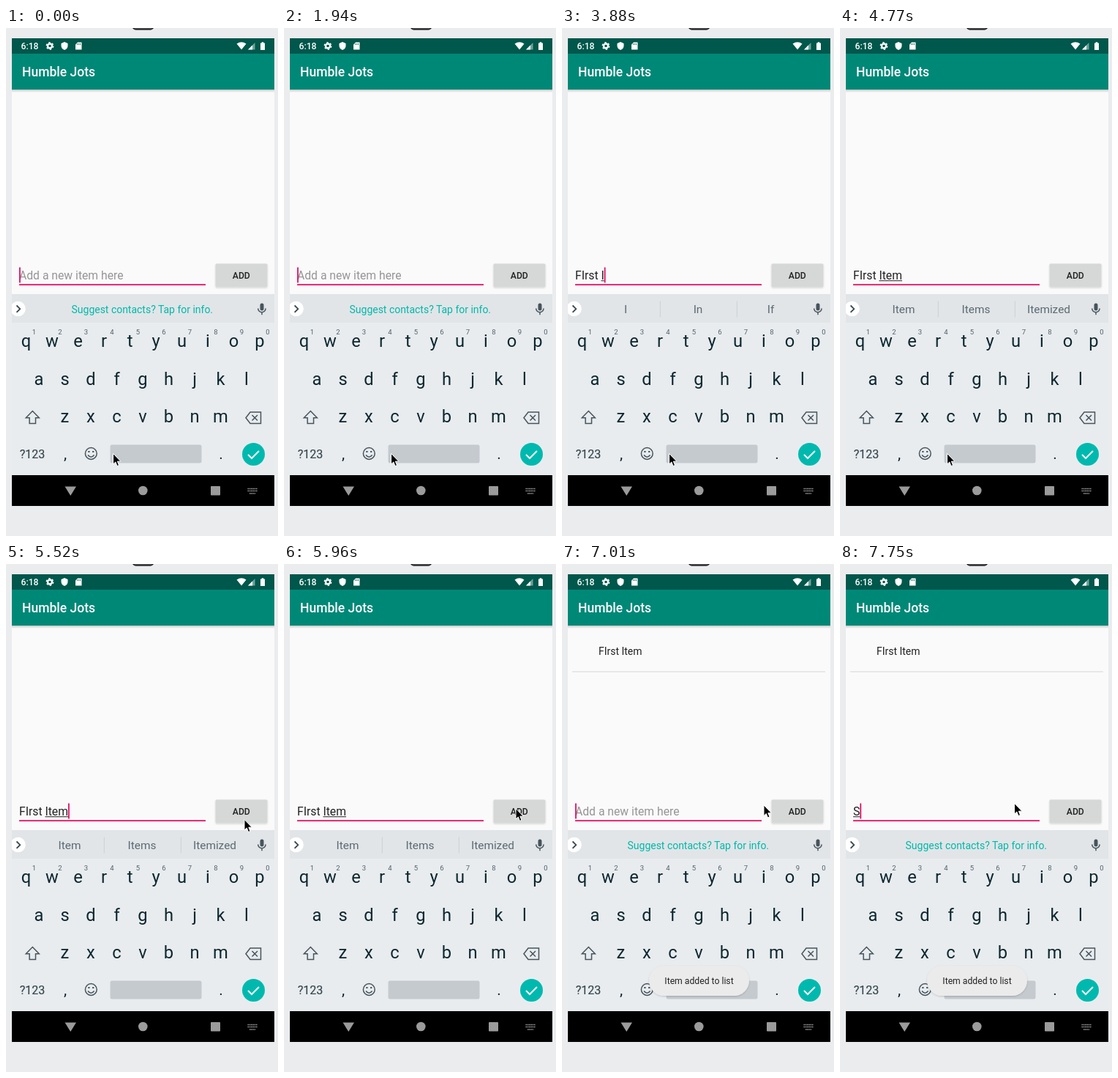
Write an HTML page that moves like this. It is 372 px wide and 693 px high and loops after 8 s.

```html
<!DOCTYPE html>
<html lang="en">
<head>
<meta charset="utf-8">
<title>Todo app</title>
<style>
  html, body { margin: 0; height: 100%; overflow: hidden; background: #ebecee; }
  svg { display: block; width: 100vw; height: 100vh; font-family: Roboto, sans-serif; }
  text { white-space: pre; }
  .mid { text-anchor: middle; }
  .bold { font-weight: 500; }
  .line { fill: none; stroke: #46545c; stroke-width: 1.5; }
</style>
</head>
<body>
<svg viewBox="0 0 372 693">
  <defs>
    <linearGradient id="fade" x2="0" y2="1">
      <stop stop-color="#000" stop-opacity=".2"/><stop offset="1" stop-color="#000" stop-opacity="0"/>
    </linearGradient>
    <filter id="soft" x="-10%" y="-20%" width="120%" height="150%">
      <feDropShadow dx="0" dy="1" stdDeviation="1.2" flood-opacity=".18"/>
    </filter>
    <clipPath id="screen"><path d="M8 14H367V652H8Z"/></clipPath>
  </defs>
  <rect width="372" height="693" fill="#ebecee"/>
  <rect x="173.5" y="-10" width="28" height="12" rx="4" fill="#55585c" stroke="#222" stroke-width="1.5"/>

  <g clip-path="url(#screen)">
    <rect x="8" y="84" width="359" height="280" fill="#fafafa"/>
    <rect x="8" y="84" width="359" height="4" fill="url(#fade)"/>
    <rect x="8" y="35" width="359" height="49" fill="#008877"/>
    <rect x="8" y="14" width="359" height="21" fill="#00574b"/>
    <rect x="8" y="363" width="359" height="39" fill="#e1e5e8"/>
    <rect x="8" y="402" width="359" height="208" fill="#e8ecef"/>
    <rect x="8" y="610" width="359" height="42"/>

    <!-- status bar -->
    <g fill="#fff">
      <text class="bold" x="20.5" y="29" font-size="12.2">6:18</text>
      <circle cx="60" cy="24.5" r="3" fill="none" stroke="#fff" stroke-width="2.4"/>
      <circle cx="60" cy="24.5" r="4.7" fill="none" stroke="#fff" stroke-width="1.4" stroke-dasharray="2.5 2.42"/>
      <path d="M80 19l4.5 2v3.2q0 4-4.5 5.8q-4.5-1.800-4.500-5.800V21z"/>
      <path d="M98 19.500h5.500v10h-8.500v-7z"/>
      <path d="M315.500 21.500q6.500-4.500 13 0l-6.500 8z"/>
      <path d="M331 29.500l9.500-9.500v9.500z" opacity=".45"/>
      <path d="M331 29.500l6-6v6z"/>
      <path d="M348 20.500h1.700v-1.200h2.600v1.200h1.700v9.500h-6z"/>
    </g>
    <path d="M97.500 21v2m2-2v2m2-2v2" stroke="#00574b" stroke-width=".8"/>
    <text class="bold" x="22" y="66" font-size="17.5" fill="#fff">Humble Jots</text>

    <!-- list and input -->
    <g id="item">
      <text x="50" y="124" font-size="13.97" fill="#212121">FIrst Item</text>
      <rect x="14" y="146.300" width="346" height="1.300" fill="#dedede"/>
    </g>
    <text id="hint" x="18" y="343" font-size="15.72" fill="#959595">Add a new item here</text>
    <text id="field" x="18" y="343" font-size="15.72" fill="#212121"></text>
    <rect id="under" y="344.200" height="1.100" fill="#333"/>
    <rect x="18" y="349.300" width="255" height="1.800" fill="#e01065"/>
    <rect id="caret" y="326.500" width="1.800" height="21" fill="#e01065"/>
    <rect x="286.500" y="321.500" width="71" height="32" rx="1.500" fill="#d6d7d7" filter="url(#soft)"/>
    <text class="mid bold" x="321.800" y="342" font-size="12.2" fill="#212121">ADD</text>

    <!-- suggestion strip -->
    <circle cx="16.500" cy="383" r="10.300" fill="#fff"/>
    <path class="line" d="M14.500 378.500l4.700 4.700-4.700 4.700" style="stroke:#37474f;stroke-width:1.800"/>
    <text id="tip" class="mid" x="186.300" y="388.500" font-size="13.97" fill="#00b8a9">Suggest contacts? Tap for info.</text>
    <g id="words" class="mid" font-size="15.4" fill="#5c6a72">
      <path d="M134.300 372.500v22m105-22v22" stroke="#cbd1d5"/>
      <text x="87" y="389"></text><text x="186" y="389"></text><text x="285.500" y="389"></text>
    </g>
    <rect x="347.500" y="375.500" width="5" height="10" rx="2.500" fill="#46545c"/>
    <path class="line" d="M344.700 382.500a5.200 5.200 0 0 0 10.400 0M350 387.700v3.600"/>

    <!-- keyboard -->
    <g id="keys" class="mid" fill="#0d2730" font-size="23.7"></g>
    <path class="line" d="M36.300 522.500l9 9.300h-4.800v7.700h-8.400v-7.700h-4.800z"/>
    <path class="line" d="M334 524h14.500v15.500H334l-6-7.700zM336.500 528l7.500 7.500m0-7.500l-7.500 7.500"/>
    <text class="mid" x="36" y="586.500" font-size="16" fill="#37474f" stroke="#37474f" stroke-width=".2">?123</text>
    <g class="mid" font-size="21" fill="#0d2730"><text x="81" y="588">,</text><text x="294" y="588">.</text></g>
    <circle class="line" cx="116.300" cy="580.500" r="7.900"/>
    <path class="line" d="M112 582.500q4.300 5.500 8.600 0"/>
    <path d="M112.300 578h2.200m3.600 0h2.200" stroke="#46545c" stroke-width="2.200"/>
    <rect x="142.500" y="568.500" width="125" height="25" rx="2.500" fill="#c5cacf"/>
    <circle cx="338.500" cy="581.500" r="15.500" fill="#00b9ae"/>
    <path class="line" d="M331 582l5 5 10-10" style="stroke:#fff;stroke-width:2"/>

    <!-- navigation -->
    <g fill="#9b9b9b">
      <path d="M80.500 625.500h15.500l-7.750 12.500z"/>
      <circle cx="187.300" cy="631" r="6.300"/>
      <rect x="280" y="625" width="13" height="12.500" rx=".8"/>
    </g>
    <path d="M330.500 628.500h13M330.500 631.500h13M333 635h8" stroke="#9b9b9b" stroke-width="1.500" stroke-dasharray="1.600 .68"/>

    <g id="toast">
      <rect x="119" y="548" width="137" height="41" rx="20.500" fill="#ebebeb" filter="url(#soft)"/>
      <text class="mid" x="187.500" y="572.500" font-size="12.2" fill="#222">Item added to list</text>
    </g>
  </g>
  <path id="mouse" d="M0 0V14.500L3.300 11.500 5.500 17 8 16 5.800 10.700H10.400Z" stroke="#fff" stroke-width="1"/>
</svg>
<script>
const $ = id => document.getElementById(id);
const show = (id, on) => $(id).setAttribute('opacity', +on);

// Each track holds [time, value] pairs; a value stays until the next one.
const typed = [[0, ''], [2240, 'F'], [2390, 'FI'], [2690, 'FIrs'], [2980, 'FIrst'], [3130, 'FIrst '],
  [3880, 'FIrst I'], [4020, 'FIrst It'], [4170, 'FIrst Ite'], [4320, 'FIrst Item'], [6110, ''], [7750, 'S']];
const hints = [[0, ''], [2690, 'FIrs First Firs'], [2980, 'FIrst First Firsts'], [3880, 'I In If'],
  [4020, 'It It’s Its'], [4170, 'Ite Item Items'], [4320, 'Item Items Itemized'], [6110, '']];
const blinks = [450, 900, 1500, 1940, 3730, 3880, 4770, 5370, 5820, 6110, 6560, 7010, 7610, 7750];
const moves = [[0, [146.5, 580.5]], [4920, [166, 555]], [5070, [228, 478]], [5220, [298, 390]], [5370, [333, 353]],
  [5520, [326, 348.5]], [5670, [321, 340]], [5820, [317, 333.5]], [7010, [276, 329]], [7160, [238.5, 326.5]]];
const fades = [[0, 0], [6260, .5], [6410, .85], [6560, 1]];
const at = (track, t) => track.findLast(([start]) => start <= t)[1];

const rows = [['qwertyuiop', 27.5, 435], ['asdfghjkl', 45, 486.5], ['zxcvbnm', 80.5, 538]];
const label = (s, x, y, more = '') => `<text x="${x}" y="${y}" ${more}>${s}</text>`;
$('keys').innerHTML = rows.map(([letters, x, y]) =>
  [...letters].map((c, i) => label(c, x + i * 35.5, y)).join('')).join('') +
  [...'1234567890'].map((c, i) => label(c, 38.5 + i * 35.5, 418, 'font-size="9.5" fill="#52616a"')).join('');

function measure(s) {
  $('field').textContent = s;
  return s ? $('field').getComputedTextLength() : 0;
}

function draw(t) {
  const text = at(typed, t), words = at(hints, t);
  const start = measure(text.slice(0, text.lastIndexOf(' ') + 1));
  const end = measure(text);
  $('under').setAttribute('x', 18 + start);
  $('under').setAttribute('width', end - start);
  $('caret').setAttribute('x', 18 + end);
  show('caret', blinks.filter(b => b <= t).length % 2 === 0);
  show('hint', !text);
  show('tip', !words);
  show('words', !!words);
  const parts = words.split(' ');
  $('words').querySelectorAll('text').forEach((el, i) => el.textContent = parts[i] || '');
  show('item', t >= 6110);
  show('toast', at(fades, t));
  $('mouse').setAttribute('transform', `translate(${at(moves, t)})`);
}

function tick() {
  draw(performance.now() % 8000);
  requestAnimationFrame(tick);
}
tick();
</script>
</body>
</html>
```
